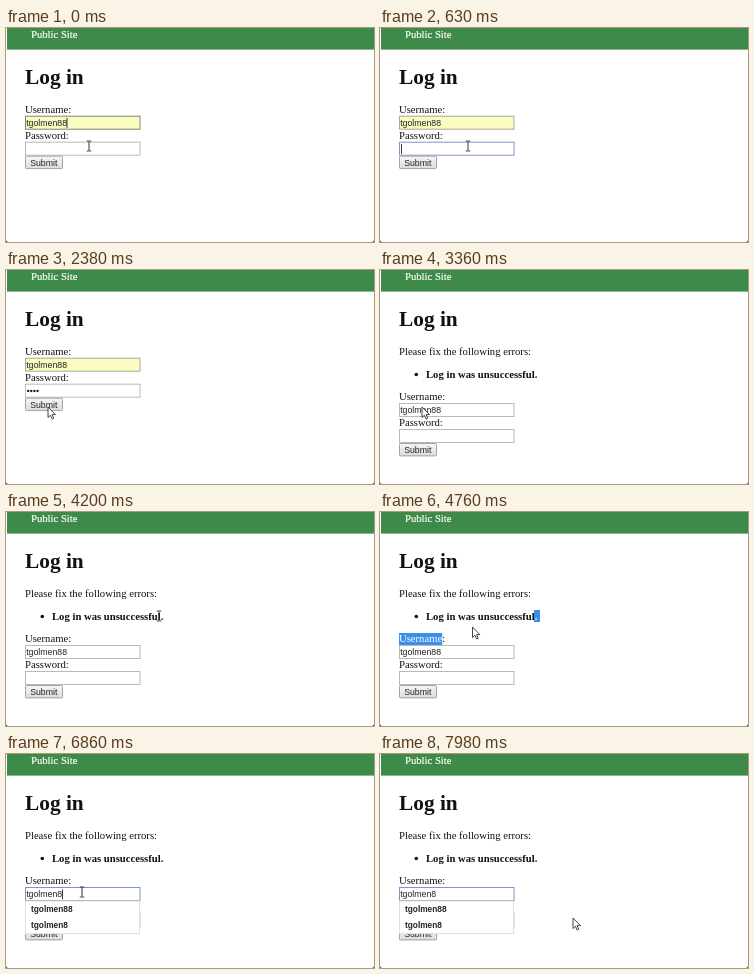
Write an HTML page that moves like this. It is 368 px wide and 214 px high and loops after 8 s.

```html
<!DOCTYPE html>
<html lang="en">
<head>
<meta charset="utf-8">
<title>Log in form</title>
<style>
  html, body { margin: 0; width: 100%; height: 100%; overflow: hidden; background: #fff; }
  svg { display: block; width: 368px; height: 214px; }
  text { font: 10.67px "Liberation Serif", "Times New Roman", serif; fill: #111; white-space: pre; }
  .site { fill: #fff; stroke: #fff; stroke-width: .2; }
  .title { font-size: 21.33px; font-weight: bold; }
  .strong { font-weight: bold; }
  .field { fill: #fff; stroke: #b9b9b9; }
  .field.auto { fill: #fbfcc2; stroke: #a9a994; }
  .field.auto.focus { stroke: #85856a; }
  .field.focus { stroke: #7f95c6; }
  .sans { font: 8.75px "Liberation Sans", Arial, sans-serif; fill: #222; }
  .option { font-size: 8.3px; font-weight: bold; }
  .caret { stroke: #222; stroke-width: .9; }
  .mark { fill: #3b8fea; }
  .picked { fill: #fff; }
</style>
</head>
<body>
<svg viewBox="0 0 368 214">
  <defs>
    <linearGradient id="face" x2="0" y2="1">
      <stop stop-color="#f6f6f6"/><stop offset="1" stop-color="#dcdcdc"/>
    </linearGradient>
  </defs>
  <rect width="368" height="214" fill="#fff"/>
  <rect x="1" width="367" height="21.6" fill="#3e8a48"/>
  <text class="site" x="25" y="9.8">Public Site</text>
  <text class="title" x="19" y="56">Log in</text>

  <g id="errors">
    <text x="19" y="85.3">Please fix the following errors:</text>
    <circle cx="36.3" cy="104.5" r="1.8" fill="#111"/>
    <rect id="dotMark" class="mark" x="154" y="98" width="6" height="12"/>
    <text class="strong" x="46" y="108">Log in was unsuccessful<tspan id="dot">.</tspan></text>
  </g>

  <g id="form">
    <rect id="nameMark" class="mark" x="19" y="75.7" height="12"/>
    <text x="19" y="85"><tspan id="nameA"></tspan><tspan id="nameB"></tspan></text>
    <rect id="user" class="field" x="19.5" y="88.2" width="114.5" height="13"/>
    <text id="userText" class="sans" x="20.2" y="97.8"></text>
    <path id="squiggle" d="M21 99.8H60" stroke="#d66a78" stroke-width=".8" stroke-dasharray="1 1" opacity=".6"/>
    <text x="19" y="111">Password:</text>
    <rect id="pass" class="field" x="19.5" y="114.2" width="114.5" height="13"/>
    <g id="bullets" fill="#111"></g>
    <rect id="button" x="19.5" y="128.2" width="37" height="12.4" rx="1" fill="url(#face)" stroke="#a4a4a4"/>
    <text class="sans" x="37.8" y="137.7" text-anchor="middle">Submit</text>
    <g id="menu">
      <rect x="19.5" y="101.7" width="114" height="32.5" fill="#fff" stroke="#e0e0e0"/>
      <text class="sans option" x="25" y="113">tgolmen88</text>
      <text class="sans option" x="25" y="129">tgolmen8</text>
    </g>
    <path id="caret" class="caret" d="M0 0v10"/>
  </g>

  <path id="arrow" d="M0 0V10.5L2.4 8.3 4.1 12 5.7 11.3 4.1 7.6H7.4Z" fill="#fff" stroke="#333" stroke-width=".9"/>
  <path id="beam" d="M-2.2 -5H-.6L0 -4.5 .6 -5H2.2M0 -4.5V4.5M-2.2 5H-.6L0 4.5 .6 5H2.2" fill="none" stroke="#333"/>
  <path d="M0 211.5V214H2.5Q0 214 0 211.5ZM368 211.5V214H365.5Q368 214 368 211.5Z" fill="#333"/>
</svg>
<script>
const LOOP = 8000;
const ARROW = "arrow", BEAM = "beam";
const el = id => document.getElementById(id);
const show = (id, on) => { el(id).style.display = on ? "" : "none"; };

// Each row starts at its time and holds until the next one.
const pointer = [
  [0, 83, 118, BEAM], [70, 84, 96, BEAM], [210, 87, 66, ARROW], [350, 88, 48, ARROW],
  [490, 89, 92, BEAM], [630, 88, 118, BEAM], [770, 89, 119, BEAM], [1050, 90, 119, BEAM],
  [1610, 82, 124, BEAM], [1750, 66, 131, ARROW], [1890, 50, 136, ARROW], [2030, 42, 138, ARROW],
  [2240, 42, 137, ARROW],
  [3570, 52, 128, ARROW], [3710, 78, 119, ARROW], [3850, 114, 109, ARROW],
  [3990, 146, 104, BEAM], [4130, 153, 104, BEAM], [4410, 146, 108, BEAM],
  [4550, 124, 111, ARROW], [4690, 102, 114, ARROW], [4760, 92.5, 115, ARROW], [4830, 90, 119, ARROW],
  [5110, 85, 124, ARROW], [5250, 78, 137, BEAM], [5390, 73, 149, BEAM],
  [5530, 71, 145, BEAM], [5740, 72, 140, BEAM], [5880, 73, 136, BEAM], [6160, 76, 138, BEAM],
  [7280, 106, 84, ARROW], [7350, 150, 7, ARROW], [7490, 192, 88, ARROW],
  [7560, 206, 167, ARROW], [7980, 193, 164, ARROW]
];
const focus = [[0, "user"], [630, "pass"], [2240, ""], [5740, "user"]];
const typed = [[0, 0], [910, 1], [1190, 2], [1330, 3], [1470, 4], [3360, 0]];
const blink = [[0, true], [6440, false], [6860, true], [7980, false]];
const picked = [[0, 0], [4550, 3], [4690, 6], [4760, 8], [4830, 0]];

const at = (rows, t) => rows.reduce((hit, row) => row[0] <= t ? row : hit);

const label = "Username:";
el("bullets").innerHTML = [0, 1, 2, 3]
  .map(i => `<circle cx="${22.2 + i * 3.1}" cy="121" r="1.15"/>`).join("");

function draw(t) {
  const failed = t >= 3360, edited = t >= 6860;
  const active = at(focus, t)[1], count = at(typed, t)[1];

  show("errors", failed);
  el("form").setAttribute("transform", `translate(0 ${failed ? 45.3 : 0})`);
  el("user").classList.toggle("auto", !failed);
  for (const id of ["user", "pass"]) el(id).classList.toggle("focus", active === id);
  el("userText").textContent = edited ? "tgolmen8" : "tgolmen88";
  show("squiggle", t >= 5740 && !edited);
  show("menu", edited);
  el("button").setAttribute("stroke", t >= 2240 && t < 2380 ? "#777" : "#a4a4a4");
  [...el("bullets").children].forEach((b, i) => { b.style.display = i < count ? "" : "none"; });

  const inPass = active === "pass";
  const caretX = inPass ? 21.5 + count * 3.1 : edited ? 56.5 : 61;
  show("caret", active && at(blink, t)[1]);
  el("caret").setAttribute("transform", `translate(${caretX} ${inPass ? 116 : 90})`);

  const n = at(picked, t)[1], dotOn = t >= 4340 && t < 4830;
  show("dotMark", dotOn);
  el("dot").setAttribute("class", dotOn ? "picked" : "");
  el("nameA").textContent = label.slice(0, n);
  el("nameA").setAttribute("class", "picked");
  el("nameB").textContent = label.slice(n);
  el("nameMark").setAttribute("width", n ? el("nameA").getComputedTextLength() : 0);

  const [, x, y, kind] = at(pointer, t);
  for (const id of [ARROW, BEAM]) show(id, id === kind);
  el(kind).setAttribute("transform", `translate(${x} ${y})`);
}

const start = performance.now();
function tick() {
  draw((performance.now() - start) % LOOP);
  requestAnimationFrame(tick);
}
tick();
</script>
</body>
</html>
```
